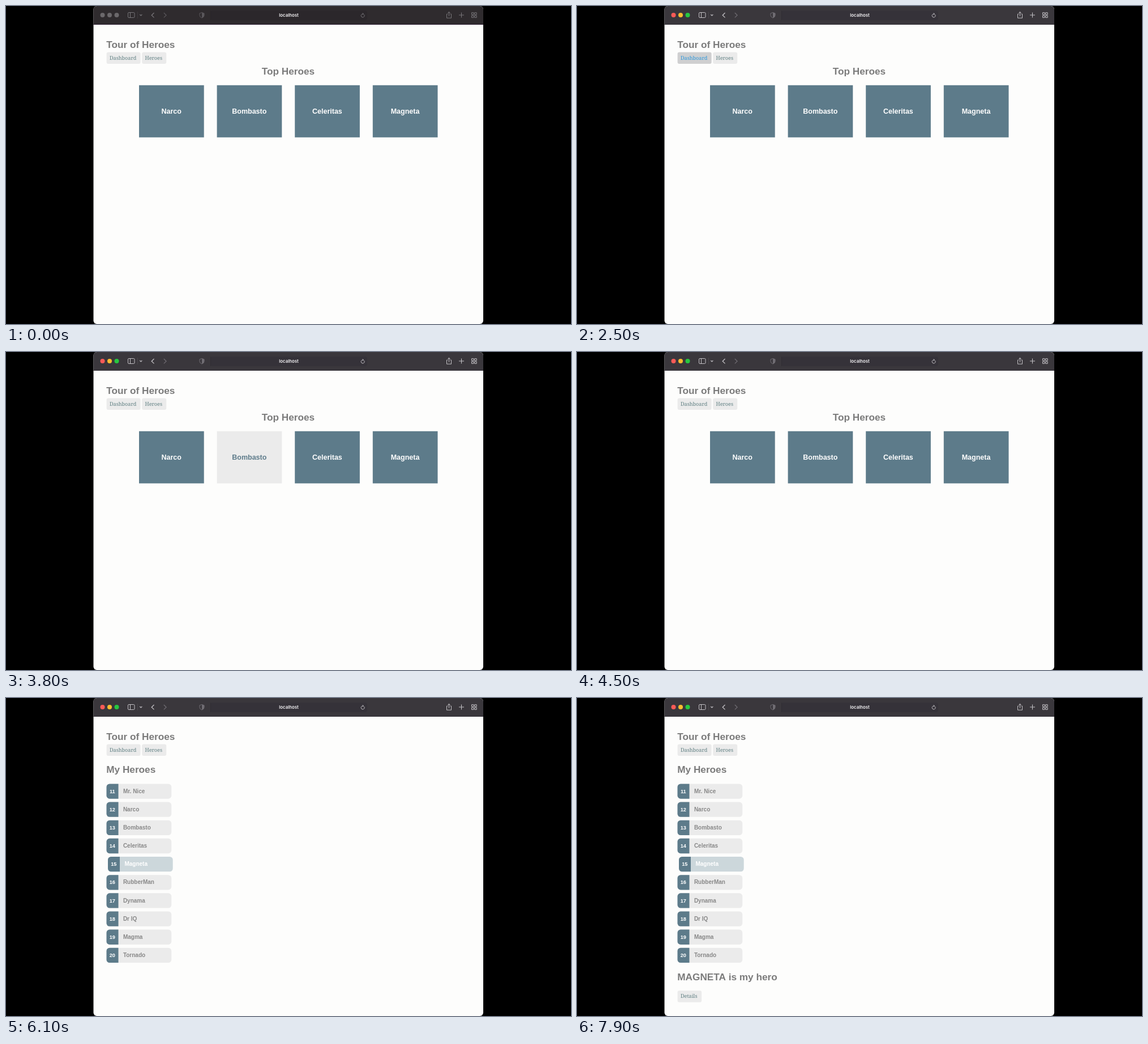
Animation, 998 px wide and 561 px high, one loop 8 s. Source, as an HTML page with a canvas:

```html
<!DOCTYPE html>
<html lang="en">
<head>
<meta charset="utf-8">
<title>Tour of Heroes</title>
<style>
  html, body { margin: 0; width: 100%; height: 100%; overflow: hidden; background: #000; }
  canvas { display: block; }
</style>
</head>
<body>
<canvas id="stage" width="998" height="561"></canvas>
<script>
const ctx = document.getElementById('stage').getContext('2d');
const LOOP = 8000;
const SANS = '"Liberation Sans", Arial, sans-serif';
const SERIF = '"Noto Serif", Georgia, serif';
const SLATE = '#5d7b8a', PALE = '#ebebeb', HEADING = '#7b7b7b';
const heroes = ['Mr. Nice', 'Narco', 'Bombasto', 'Celeritas', 'Magneta',
                'RubberMan', 'Dynama', 'Dr IQ', 'Magma', 'Tornado'];

// Timeline in ms
const ACTIVATE = 500, OPEN_LIST = 5300, SELECT = 7500;
const within = (t, from, to) => t >= from && t < to;

function hoveredCard(t) {
  if (!within(t, 3600, 4500)) return -1;
  return Math.min(3, Math.floor((t - 3600) / 200));
}

// The pointer runs down the list, turns at the bottom and settles on row 4.
function hoveredRow(t) {
  if (t < 5650) return -1;
  if (t < 6650) return Math.floor((t - 5650) / 100);
  return Math.max(4, 8 - Math.floor((t - 6650) / 150));
}

function box(x, y, w, h, color, radius = 0) {
  ctx.fillStyle = color;
  ctx.beginPath();
  ctx.roundRect(x, y, w, h, radius);
  ctx.fill();
}

function text(str, x, y, font, color, align = 'left') {
  ctx.font = font;
  ctx.fillStyle = color;
  ctx.textAlign = align;
  ctx.fillText(str, x, y);
}

function line(path, color, width = 1) {
  ctx.strokeStyle = color;
  ctx.lineWidth = width;
  ctx.stroke(new Path2D(path));
}

const heading = (str, x, y, align) => text(str, x, y, `bold 17.2px ${SANS}`, HEADING, align);

function button(label, x, y, w, hover) {
  box(x, y, w, 20.5, hover ? '#cfcfd0' : PALE, 3);
  text(label, x + 5.3, y + 13.2, `9.1px ${SERIF}`, hover ? '#2b98dc' : '#5f7f82');
}

function drawToolbar(active) {
  const icon = active ? '#c3c1c5' : '#777579';
  const dim = active ? '#706d73' : '#5a575b';
  box(154.5, 0, 688.5, 33, active ? '#3a373c' : '#2f2b2e', [6, 6, 0, 0]);
  box(154.5, 32, 688.5, 1, active ? '#343137' : '#2b1c30');
  box(361, 8, 277, 17, active ? '#353239' : '#2b272b', 4);

  const lights = active ? ['#fc5b57', '#fdbc2e', '#27c840'] : ['#6b686b', '#6b686b', '#6b686b'];
  lights.forEach((color, i) => box(166.5 + 12.5 * i, 12, 8, 8, color, 4));

  line('M217 11.5h8.5q1.5 0 1.5 1.5v6q0 1.5-1.5 1.5h-8.5q-1.5 0-1.5-1.5v-6q0-1.5 1.5-1.5zM219.5 11.5v9', icon);
  line('M232.5 10v12', active ? '#4b484d' : '#3d393d');
  line('M236.3 15l2 2 2-2', icon, 1.2);
  line('M261.5 12l-4.3 4.2 4.3 4.2', icon, 1.3);
  line('M278.8 12l4.3 4.2-4.3 4.2', dim, 1.2);

  line('M346 11.5l4 1.4v3.6q0 3-4 4.6q-4-1.6-4-4.6v-3.6z', dim);
  ctx.fillStyle = dim;
  ctx.fill(new Path2D('M346 11.5l4 1.4v3.6q0 3-4 4.6z'));
  line('M361.5 8v17', active ? '#302d33' : '#282428');

  text('localhost', 499.5, 19.3, '600 7.8px Inter, sans-serif', '#f4f3f5', 'center');
  line('M632.6 15.2a3 3 0 1 1-2.6-1.2h1.4M629.8 12.4l1.7 1.6-1.7 1.6', icon);
  line('M780.3 14.2h-1.8v7h8v-7h-1.8M782.5 18v-7.5M780.2 12.6l2.3-2.3 2.3 2.3', icon);
  line('M800 16h9M804.5 11.5v9', icon, 1.1);
  for (const x of [822.5, 827.7])
    for (const y of [11.7, 16.9]) line(`M${x} ${y}h3.5v3.5h-3.5z`, icon);
}

function drawDashboard(t) {
  heading('Top Heroes', 498.5, 121, 'center');
  const hover = hoveredCard(t);
  heroes.slice(1, 5).forEach((name, i) => {
    const x = 235 + 137.6 * i, over = i === hover;
    box(x, 139.7, 114.7, 92, over ? PALE : SLATE);
    text(name, x + 57.2, 190, `bold 12.5px ${SANS}`, over ? SLATE : '#fff', 'center');
  });
}

function drawList(t) {
  heading('My Heroes', 177.3, 132);
  const hover = hoveredRow(t);
  heroes.forEach((name, i) => {
    const over = i === hover;
    const x = over ? 180 : 177.5, y = 151.4 + 32.15 * i;
    box(x, y, 114.7, 26.3, over ? '#ccd7db' : PALE, 5.5);
    box(x, y, 21, 26.3, SLATE, [5.5, 0, 0, 5.5]);
    text(i + 11, x + 10.3, y + 16.2, `bold 9.2px ${SANS}`, '#fff', 'center');
    text(name, x + 29.4, y + 16.3, `bold 10px ${SANS}`, over ? '#fff' : '#888');
  });
  if (t >= SELECT) {
    heading(`${heroes[4].toUpperCase()} is my hero`, 177.3, 497.5);
    button('Details', 177.6, 516.2, 42.5, false);
  }
}

function draw(t) {
  box(0, 0, 998, 561, '#000');
  box(154.5, 0, 688.5, 561, '#fdfdfc', 6);
  drawToolbar(t >= ACTIVATE);
  heading('Tour of Heroes', 177.3, 74);
  button('Dashboard', 177.6, 81.6, 60, within(t, 2100, 2800));
  button('Heroes', 240.2, 81.6, 43, within(t, 2800, 3000) || within(t, 5000, 5550));
  (t < OPEN_LIST ? drawDashboard : drawList)(t);
}

const start = performance.now();
function tick() {
  draw((performance.now() - start) % LOOP);
  requestAnimationFrame(tick);
}
tick();
</script>
</body>
</html>
```
